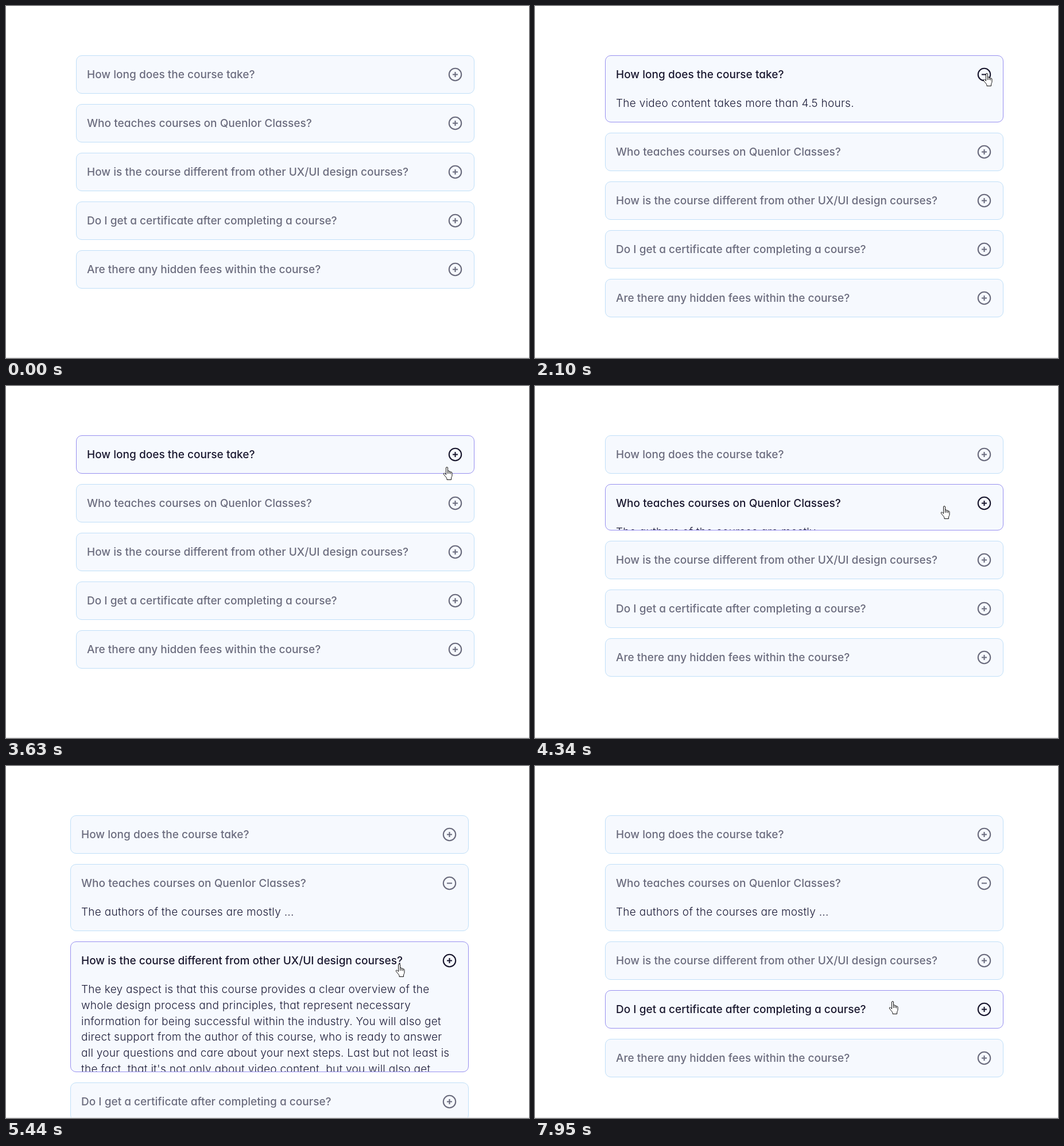
Animation, 911 px wide and 614 px high, one loop 8 s. Source, as an HTML page:

```html
<!DOCTYPE html>
<html lang="en">
<head>
<meta charset="utf-8">
<title>FAQ accordion</title>
<style>
html, body { margin: 0; width: 100%; height: 100%; overflow: hidden; background: #fff; }
body { position: relative; font: 500 19px Inter, "Open Sans", sans-serif; font-feature-settings: "cv11"; }
.item { position: absolute; left: 0; top: 0; width: 694px; box-sizing: border-box; overflow: hidden;
  background: #f6f9fe; border: 1px solid; border-radius: 10px; }
.title { position: absolute; left: 18px; top: 0; line-height: 65px; white-space: pre; letter-spacing: 0.03px; }
.answer { position: absolute; left: 18px; top: 69px; line-height: 27.75px; white-space: pre;
  font-weight: 300; letter-spacing: 0.29px; color: #1c1c38; }
.icon { position: absolute; left: 647px; top: 20px; fill: none; stroke: currentColor; stroke-width: 2.1; }
.floor { position: absolute; left: 0; top: 613px; width: 100%; height: 1px; background: #dedee1; }
.glow { position: absolute; left: -16px; top: -13px; width: 28px; height: 28px; border-radius: 50%;
  background: #f9f03c; mix-blend-mode: multiply; }
.cursor { position: absolute; left: 0; top: 0; overflow: visible; fill: #fff; stroke: #111;
  stroke-width: 1; stroke-linejoin: round; }
</style>
</head>
<body>
<script>
const LOOP = 8000, SLIDE = 400, HEAD = 67, GAP = 18, LINE = 27.75;

const items = [
  { q: "How long does the course take?", a: ["The video content takes more than 4.5 hours."], open: 1660, close: 2922 },
  { q: "Who teaches courses on Quenlor Classes?", a: ["The authors of the courses are mostly ..."], open: 4200 },
  { q: "How is the course different from other UX/UI design courses?", a: [
    "The key aspect is that this course provides a clear overview of the",
    "whole design process and principles, that represent necessary",
    "information for being successful within the industry. You will also get",
    "direct support from the author of this course, who is ready to answer",
    "all your questions and care about your next steps. Last but not least is",
    "the fact, that it's not only about video content, but you will also get",
    "additional materials, regular feedback and a helpful community to",
    "learn from."], open: 5198, close: 7071 },
  { q: "Do I get a certificate after completing a course?", a: [] },
  { q: "Are there any hidden fees within the course?", a: [] }
];

// time, x, y of the pointer tip
const path = [
  [330, 862, 574], [530, 829, 311], [800, 829, 311], [1450, 787, 117], [3350, 787, 117],
  [3720, 765, 145], [4020, 713, 209], [4600, 713, 209], [5020, 685, 345], [5460, 685, 345],
  [5860, 672, 452], [6110, 672, 452], [6570, 661, 335], [6840, 661, 335], [6850, 660, 334],
  [7420, 660, 334], [7800, 630, 394], [7950, 623, 410]
];
const clicks = [1540, 2885, 4040, 5030, 7040];

const clamp = v => Math.min(1, Math.max(0, v));
const smooth = v => { v = clamp(v); return v * v * (3 - 2 * v); };
const mix = (a, b, k) => `rgb(${a.map((v, i) => Math.round(v + (b[i] - v) * k)).join()})`;

function pointer(t) {
  if (t < path[0][0]) return null;
  const n = path.findIndex(p => p[0] > t);
  if (n < 0) return path.at(-1).slice(1);
  const [a, b] = [path[n - 1], path[n]];
  const k = smooth((t - a[0]) / (b[0] - a[0]));
  return [a[1] + (b[1] - a[1]) * k, a[2] + (b[2] - a[2]) * k];
}

function layout(t) {
  let y = 86;
  const boxes = items.map(({ a, open = Infinity, close = Infinity }) => {
    const full = a.length ? 50 + (a.length - 1) * LINE : 0;
    const part = smooth((t - open) / SLIDE) - smooth((t - close) / SLIDE);
    const box = { y, h: HEAD + Math.round(full * part), minus: t >= open + SLIDE && t < close + SLIDE };
    y += box.h + GAP;
    return box;
  });
  // the page scrollbar pushes the column left once the list is too tall
  return { boxes, x: y - GAP > 613 ? 112 : 122 };
}

function hit(t) {
  const p = pointer(t), { boxes, x } = layout(t);
  if (!p || p[0] < x || p[0] > x + 694) return { item: -1, head: false };
  const item = boxes.findIndex(b => p[1] >= b.y && p[1] < b.y + b.h);
  return { item, head: item >= 0 && p[1] < boxes[item].y + HEAD };
}

// colour fades are the mean of the hover state over the last moments
function hover(t) {
  const border = [0, 0, 0, 0, 0], head = [0, 0, 0, 0, 0], n = 6;
  for (let i = 0; i < n; i++) {
    const h = hit(t - i * 22);
    if (h.item >= 0) {
      border[h.item] += 1 / n;
      if (h.head) head[h.item] += 1 / n;
    }
  }
  return { border, head };
}

const add = (tag, cls, parent, html = "") => {
  const el = document.createElement(tag);
  el.className = cls;
  el.innerHTML = html;
  return parent.appendChild(el);
};

const views = items.map(({ q, a }) => {
  const box = add("div", "item", document.body);
  const head = add("div", "head", box);
  add("div", "title", head, q);
  head.insertAdjacentHTML("beforeend",
    `<svg class="icon" width="25" height="25"><circle cx="12.5" cy="12.5" r="10.7"/><path d="M8 12.5h9"/><path class="bar" d="M12.5 8v9"/></svg>`);
  add("div", "answer", box, a.join("\n"));
  return { box, head, bar: head.querySelector(".bar") };
});
const glow = add("div", "glow", document.body);
document.body.insertAdjacentHTML("beforeend", `<svg class="cursor" width="24" height="24">
  <path d="M.5.5v16l3.8-3.5 2.4 5.2 2.4-1-2.4-5.1h5.2z"/>
  <g><path d="M-1.5 13.5V2a1.5 1.5 0 0 1 3 0V8c0-1.6 2.6-1.6 2.6.2V9c0-1.5 2.5-1.4 2.5.3V10c0-1.3 2.4-1.3 2.4.6V15c0 2-1.5 3.5-1.5 5v2.5H0V20.5C-1 18-4 15.5-5.5 13c-.9-1.6.8-2.6 2-1.5z"/>
  <path fill="none" d="M1.5 8v4M4.1 9v3M6.6 10v2.5"/></g>
  <path fill="none" d="M-3-8.5h2.5q.5 0 .5.5V8q0 .5-.5.5H-3M3-8.5H.5Q0-8.5 0-8V8q0 .5.5.5H3"/></svg>`);
const cursor = document.querySelector(".cursor");
add("div", "floor", document.body);

function draw(t) {
  const { boxes, x } = layout(t), { border, head } = hover(t);
  views.forEach((v, i) => {
    v.box.style.transform = `translate(${x}px, ${boxes[i].y}px)`;
    v.box.style.height = boxes[i].h + "px";
    v.box.style.borderColor = mix([192, 223, 248], [151, 143, 240], border[i]);
    v.head.style.color = mix([107, 108, 126], [25, 23, 46], head[i]);
    v.bar.style.display = boxes[i].minus ? "none" : "";
  });

  const p = pointer(t);
  cursor.style.display = p ? "" : "none";
  const since = t - clicks.findLast(c => c <= t);
  glow.style.opacity = since >= 0 ? 1 - clamp((since - 140) / 40) : 0;
  if (!p) return;
  const at = `translate(${Math.round(p[0])}px, ${Math.round(p[1])}px)`;
  cursor.style.transform = glow.style.transform = at;
  const h = hit(t), kind = h.item < 0 ? 0 : h.head ? 1 : 2;
  [...cursor.children].forEach((c, i) => { c.style.display = i === kind ? "" : "none"; });
}

const start = performance.now();
function tick(now) {
  draw(Math.max(0, now - start) % LOOP);
  requestAnimationFrame(tick);
}
draw(0);
requestAnimationFrame(tick);
</script>
</body>
</html>
```
